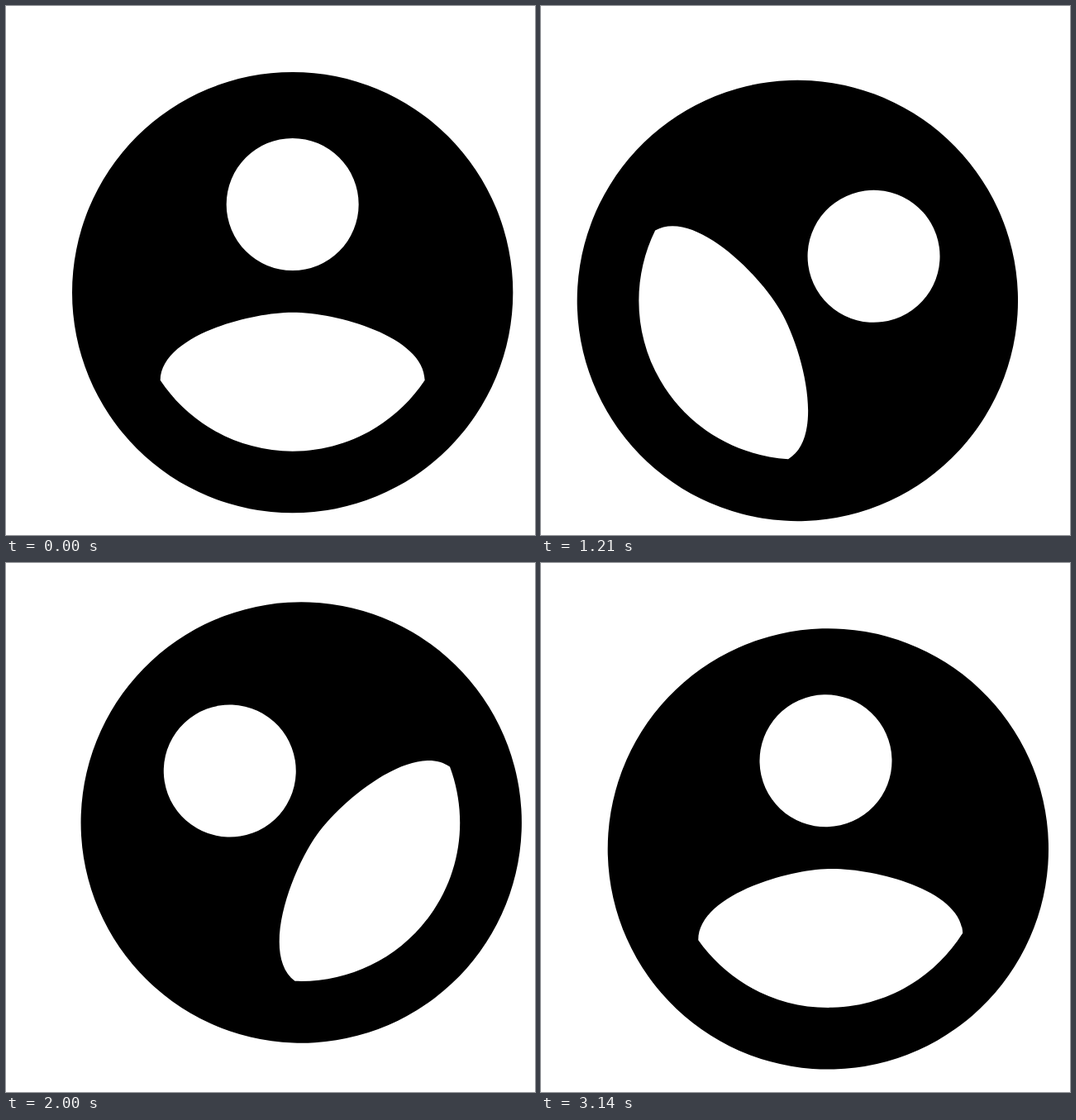
Write an HTML page that moves like this. It is 640 px wide and 640 px high and loops after 3.21 s.

```html
<!DOCTYPE html>
<html lang="en">
<head>
<meta charset="utf-8">
<title>Rolling account icon</title>
<style>
  html, body { margin: 0; width: 100%; height: 100%; overflow: hidden; background: #fff; }
  svg { display: block; width: 100vw; height: 100vh; }
</style>
</head>
<body>
<svg viewBox="0 0 24 24">
  <g id="icon">
    <path transform="translate(1 1)" fill-rule="evenodd" d="
      M2 12a10 10 0 1 0 20 0a10 10 0 1 0-20 0z
      M9 8a3 3 0 1 0 6 0a3 3 0 1 0-6 0z
      M12 19.2c-2.5 0-4.71-1.28-6-3.22 .03-1.99 4-3.08 6-3.08 1.99 0 5.97 1.09 6 3.08-1.29 1.94-3.5 3.22-6 3.22z"/>
  </g>
</svg>
<script>
  const LOOP = 3210, SPIN = 3000, FPS = 14;
  const icon = document.getElementById('icon');

  // Timing curve with the same meaning as CSS cubic-bezier()
  function bezier(x1, y1, x2, y2) {
    const at = (a, b, s) => 3 * a * s * (1 - s) ** 2 + 3 * b * s * s * (1 - s) + s ** 3;
    return x => {
      let lo = 0, hi = 1;
      for (let i = 0; i < 30; i++) {
        const mid = (lo + hi) / 2;
        if (at(x1, x2, mid) < x) lo = mid; else hi = mid;
      }
      return at(y1, y2, lo);
    };
  }

  const soft = bezier(.53, 0, .57, 1);

  // Wind back, speed up, slow down past the full turn, settle
  const parts = [
    { t0: 0, t1: 450, from: 0, to: -10, ease: soft },
    { t0: 450, t1: 1785.7, from: -10, to: 242.2, ease: bezier(.455, 0, .68, .34) },
    { t0: 1785.7, t1: 2550, from: 242.2, to: 366, ease: bezier(.3, .65, .6, 1) },
    { t0: 2550, t1: SPIN, from: 366, to: 360, ease: soft }
  ];

  function angle(t) {
    const p = parts.find(part => t < part.t1);
    return p.from + (p.to - p.from) * p.ease((t - p.t0) / (p.t1 - p.t0));
  }

  const start = performance.now();

  function draw() {
    const t = (performance.now() - start) % LOOP;
    // Each pose is held for one step; steps fall on the nearest 10 ms
    const step = Math.floor((t + 5) * FPS / 1000);
    const a = angle((step * 1000 / FPS) % SPIN);
    icon.setAttribute('transform', `rotate(${a.toFixed(3)} 12 12)`);
    requestAnimationFrame(draw);
  }
  draw();
</script>
</body>
</html>
```
